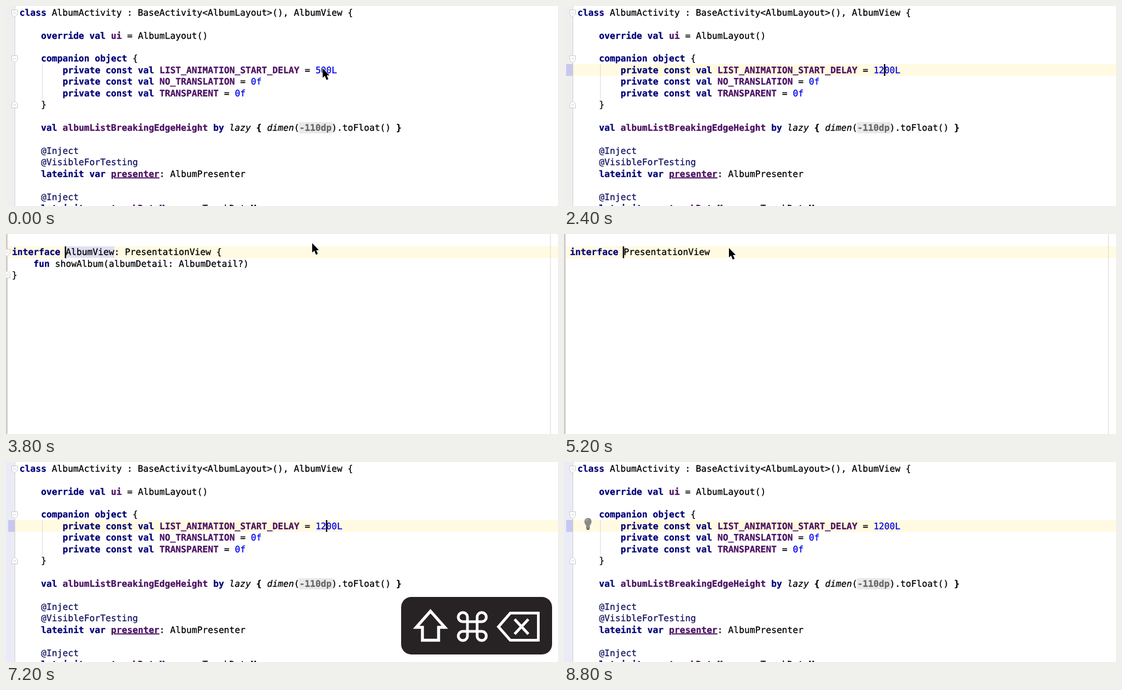
These frames come from a looping animation (1024 px wide and 372 px high, 9000 ms). An HTML page:

```html
<!DOCTYPE html>
<html lang="en">
<head>
<meta charset="utf-8">
<title>Jump to last edit</title>
<style>
  html, body { margin: 0; width: 100%; height: 100%; overflow: hidden; background: #fff; }
  svg { display: block; width: 100vw; height: 100vh; }
  text {
    font: 16.58px "DejaVu Sans Mono", monospace;
    white-space: pre; text-rendering: geometricPrecision; color: #000;
  }
  text, tspan { fill: currentColor; stroke: currentColor; stroke-width: .3px; }
  .k { font-weight: bold; color: #000078; }
  .p { font-weight: bold; color: #4c1263; }
  .u { font-weight: bold; color: #4c1263; text-decoration: underline; }
  .b { font-weight: bold; }
  .i { font-style: italic; }
  .n { color: #0000f0; }
  .a { color: #141462; }
  .g { font-weight: bold; color: #666; }
  .link { color: #0000e0; text-decoration: underline; }
  .fold { fill: #fff; stroke: #c8c6c4; }
</style>
</head>
<body>
<svg viewBox="0 0 1024 372" preserveAspectRatio="none">
  <rect id="page" width="1024" height="372" fill="#fff"/>
  <g id="main">
    <rect id="gutter" width="16" height="372"/>
    <g id="row">
      <rect x="17" y="108" width="1007" height="22" fill="#fffae1"/>
      <rect x="4" y="108" width="12" height="22" fill="#c8c8ee"/>
    </g>
    <path d="M16.5 0V372" stroke="#cfcdcb"/>
    <path d="M67.5 108V173" stroke="#dadada"/>
    <rect id="pill" x="543" y="216" width="64" height="21" rx="3" fill="#e9e9e9"/>
    <g id="code"></g>
    <g id="bulb">
      <path d="M41 118C36 113 37 104 44.500 104S53 113 48 118V121H41Z" fill="#8b8b8b"/>
      <path d="M41 122.500H48M42 125H47" stroke="#555" stroke-width="2"/>
      <path d="M41 109Q42 107 44 107" stroke="#c8c8c8" stroke-width="1.500" fill="none"/>
    </g>
  </g>
  <g id="file">
    <rect y="23" x="3" width="1021" height="22" fill="#fffae1"/>
    <rect id="mark" x="111" y="23" width="90" height="21" fill="#dfdff6"/>
    <path d="M1.500 0V372" stroke="#d2cbcb" stroke-width="3"/>
    <path d="M1010 0V372" stroke="#e2e2e2" stroke-width="1.500"/>
    <g id="album"></g>
    <g id="base"></g>
  </g>
  <rect id="caret" width="2.500" height="22"/>
  <path id="arrow" d="M0 0V17.500L4 14L7 21.500L10.500 20L7.500 13H12.500Z" stroke="#fff" stroke-width="1.500" paint-order="stroke"/>
  <path id="beam" d="M-4 -8Q0 -8 0 -5Q0 -8 4 -8M0 -5V7M-3 2H3M-4 10Q0 10 0 7Q0 10 4 10" fill="none" stroke="#222" stroke-width="1.500"/>
  <g id="keys" fill="none" stroke="#fff" stroke-width="5">
    <rect x="733" y="251" width="280" height="107" rx="19" fill="#272324" stroke="none"/>
    <path d="M787.500 277.500L814 307.500H802.500V331.500H772.500V307.500H761Z" stroke-width="5.500"/>
    <path d="M856 297H847.500a8.500 8.500 0 1 1 8.500-8.500V323.500a8.500 8.500 0 1 1-8.500-8.500H882.500a8.500 8.500 0 1 1-8.500 8.500V288.500a8.500 8.500 0 1 1 8.500 8.500Z"/>
    <path d="M913.500 306.500L935.500 281H987.500V331.500H935.500ZM943.500 292.500L969 320M969 292.500L943.500 320"/>
  </g>
</svg>
<script>
const NS = "http://www.w3.org/2000/svg", LINE = 21.45, LOOP = 9000, STEP = 200;
const $ = id => document.getElementById(id);

function add(parent, tag, attrs = {}, text = "") {
  const el = document.createElementNS(NS, tag);
  for (const k in attrs) el.setAttribute(k, attrs[k]);
  el.textContent = text;
  return parent.appendChild(el);
}

// Styled spans are written ~class text~.
function write(parent, x, row, src) {
  const el = add(parent, "text", { x, y: 17.6 + row * LINE });
  return src.split("~").map((part, i) => i % 2
    ? add(el, "tspan", { class: part[0] }, part.slice(2))
    : add(el, "tspan", {}, part));
}

function fold(parent, x, y, dir) {
  const g = add(parent, "g", { transform: `translate(${x} ${y})`, class: "fold" });
  add(g, "path", { d: "M-5.500 -5.500H5.500V2L0 7.500L-5.500 2Z", transform: `scale(1 ${dir})` });
  add(g, "path", { d: "M-3 0H3" });
}

const code = $("code");
const val = (row, name, value) => write(code, 105, row, `~k private const val~ ~p ${name}~ = ~n ${value}~`);

const head = write(code, 25, 0, "~k class~ AlbumActivity : BaseActivity<AlbumLayout>(), ~x AlbumView~ {");
write(code, 65, 2, "~k override val~ ~p ui~ = AlbumLayout()");
write(code, 65, 4, "~k companion object~ {");
const number = val(5, "LIST_ANIMATION_START_DELAY", "500L")[5];
val(6, "NO_TRANSLATION", "0f");
val(7, "TRANSPARENT", "0f");
write(code, 65, 8, "}");
write(code, 65, 10, "~k val~ ~p albumListBreakingEdgeHeight~ ~k by~ ~i lazy~ ~b {~ ~i dimen~(~g -110dp~).toFloat() ~b }~");
write(code, 65, 12, "~a @Inject~");
write(code, 65, 13, "~a @VisibleForTesting~");
write(code, 65, 14, "~k lateinit var~ ~u presenter~: AlbumPresenter");
write(code, 65, 16, "~a @Inject~");
write(code, 65, 17, "~k lateinit var~ ~u trackDataMapper~: TrackDataMapper");
fold(code, 16, 13, 1);
fold(code, 16, 98, 1);
fold(code, 16, 184, -1);

const album = $("album");
const decl = write(album, 11, 1, "~k interface~ AlbumView: ~x PresentationView~ {");
write(album, 51, 2, "~k fun~ showAlbum(albumDetail: AlbumDetail?)");
write(album, 11, 3, "}");
fold(album, 2, 34, 1);
fold(album, 2, 76, -1);
write($("base"), 11, 1, "~k interface~ PresentationView");

const show = (id, on) => $(id).style.display = on ? "" : "none";
const move = (id, x, y) => $(id).setAttribute("transform", `translate(${x} ${y})`);
const within = (t, a, b) => t >= a && t < b;
const link = (span, on) => span.setAttribute("class", on ? "link" : "x");

function glide(t, start, end, from, to) {
  const p = Math.min(1, Math.max(0, (t - start) / (end - start)));
  const e = p * p * (3 - 2 * p);
  return from.map((v, i) => v + (to[i] - v) * e);
}

function mouseAt(t) {
  if (t < 3800) return glide(t, 2600, 3200, [587.5, 116], [567, 18]);
  return glide(t, 3800, 4600, [568, 17], [306, 26]);
}

function valueAt(t) {
  if (t < 1200) return "500L";
  if (t < 1800) return "00L";
  return t < 2200 ? "100L" : "1200L";
}

function caretAt(t) {
  if (within(t, 3800, 6800)) return [109, 23];
  const x = t < 1200 ? 584 : t < 1800 ? 574 : t < 2200 ? 584 : 593.5;
  return [x, 108];
}

function draw(t) {
  const inFile = within(t, 3800, 6800);
  show("main", !inFile);
  show("file", inFile);
  show("album", t < 5000);
  show("mark", t < 5000);
  show("base", t >= 5000);

  const dim = within(t, 1400, 1800);
  $("page").setAttribute("fill", dim ? "#eff0f0" : "#fff");
  $("gutter").setAttribute("fill", t >= 6800 ? "#ebebf7" : dim ? "#e9e9e9" : "#efefef");
  show("pill", !dim);
  show("row", t >= 800);
  show("bulb", within(t, 2800, 3800) || t >= 8200);
  number.textContent = valueAt(t);
  link(head[3], within(t, 3200, 3800));
  link(decl[3], within(t, 4600, 5000));

  const off = within(t, 5800, 6200) || within(t, 7600, 8200) || t >= 8800;
  show("caret", t >= 800 && !off);
  move("caret", ...caretAt(t));

  const beam = within(t, 3200, 3800);
  show("beam", beam);
  show("arrow", !beam && (t < 1200 || within(t, 2600, 6800)));
  move("beam", ...mouseAt(t));
  move("arrow", ...mouseAt(t));

  show("keys", within(t, 6600, 8600));
  $("keys").style.opacity = t < 8200 ? 1 : (8600 - t) / 600;
}

const began = performance.now();
function tick() {
  const t = (performance.now() - began) % LOOP;
  draw(Math.floor(t / STEP) * STEP);
  requestAnimationFrame(tick);
}
tick();
</script>
</body>
</html>
```
